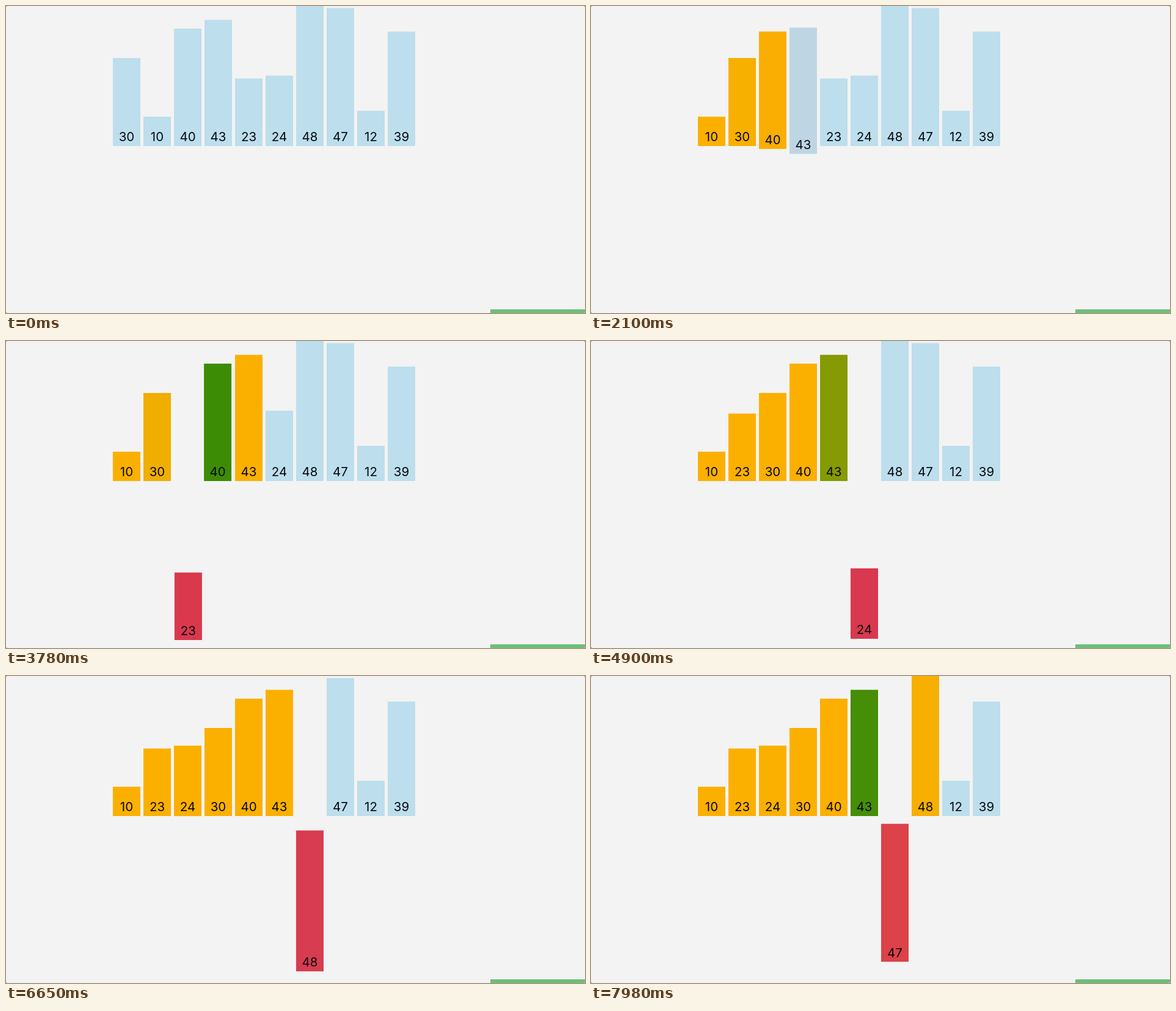
An HTML page for the animation above (8 s loop, 948 px wide and 502 px high).

```html
<!DOCTYPE html>
<html lang="en">
<head>
<meta charset="utf-8">
<title>Insertion sort</title>
<style>
  html, body { margin: 0; width: 100%; height: 100%; overflow: hidden; background: #777; }
  svg { display: block; width: 100vw; height: 100vh; }
  text { font: 20.5px Inter, Roboto, sans-serif; text-anchor: middle; fill: #080810; }
</style>
</head>
<body>
<svg id="stage" viewBox="0 0 948 502">
  <rect width="948" height="502" rx="2.5" fill="#f3f3f3"/>
  <path d="M793 496H948V500L946 502H793Z" fill="#6bc077"/>
</svg>
<script>
const LOOP = 8000, TICK = 70;
const START = 365, STEP = 209.6, DURATION = 252;
const LEFT = 175, PITCH = 50, WIDTH = 45, BASE = 229, UNIT = 4.8, DROP = 260;
const BLUE = [189, 222, 236], ORANGE = [251, 176, 0], GREEN = [48, 138, 6], RED = [217, 56, 77];
const values = [30, 10, 40, 43, 23, 24, 48, 47, 12, 39];

const ease = t => t < 0.5 ? 4 * t ** 3 : 1 - 4 * (1 - Math.min(t, 1)) ** 3;
const mix = (a, b, k) => a.map((v, i) => v + (b[i] - v) * k);

// A pose holds x, drop and colour of one bar.
function sortSteps() {
  const order = values.map((_, i) => i);
  const colors = values.map(() => BLUE);
  const drops = values.map(() => 0);
  const steps = [];
  const save = () => steps.push(values.map((_, i) =>
    [LEFT + PITCH * order.indexOf(i), drops[i], ...colors[i]]));

  save();
  colors[0] = ORANGE;
  save();
  for (let i = 1; i < values.length; i++) {
    const key = order[i];
    colors[key] = RED;
    drops[key] = DROP;
    save();
    for (let j = i - 1; j >= 0; j--) {
      const other = order[j];
      colors[other] = GREEN;
      save();
      const bigger = values[other] > values[key];
      if (bigger) {
        [order[j], order[j + 1]] = [key, other];
        save();
      }
      colors[other] = ORANGE;
      if (!bigger) break;
    }
    colors[key] = ORANGE;
    drops[key] = 0;
    save();
  }
  return steps;
}

// Each step begins before the previous transition has fully settled.
const steps = sortSteps();
const reached = [steps[0]];
for (let n = 1; n < steps.length; n++) {
  reached[n] = steps[n].map((goal, i) => mix(reached[n - 1][i], goal, ease(STEP / DURATION)));
}

const stage = document.getElementById("stage");
function add(tag, attrs) {
  const el = document.createElementNS("http://www.w3.org/2000/svg", tag);
  for (const name in attrs) el.setAttribute(name, attrs[name]);
  return stage.appendChild(el);
}
const bars = values.map(v => add("rect", { width: WIDTH, height: v * UNIT }));
const labels = values.map(v => {
  const el = add("text", {});
  el.textContent = v;
  return el;
});

function draw(time) {
  const n = Math.max(0, Math.floor((time - START) / STEP) + 1);
  const k = n ? ease((time - START - (n - 1) * STEP) / DURATION) : 0;
  values.forEach((v, i) => {
    const [x, drop, ...rgb] = n ? mix(reached[n - 1][i], steps[n][i], k) : steps[0][i];
    bars[i].setAttribute("x", x);
    bars[i].setAttribute("y", BASE + drop - v * UNIT);
    bars[i].setAttribute("fill", `rgb(${rgb.map(Math.round)})`);
    labels[i].setAttribute("x", x + WIDTH / 2);
    labels[i].setAttribute("y", BASE + drop - 7.7);
  });
}

const origin = performance.now();
function frame() {
  const time = (performance.now() - origin) % LOOP;
  draw(Math.floor(time / TICK) * TICK);
  requestAnimationFrame(frame);
}
frame();
</script>
</body>
</html>
```
